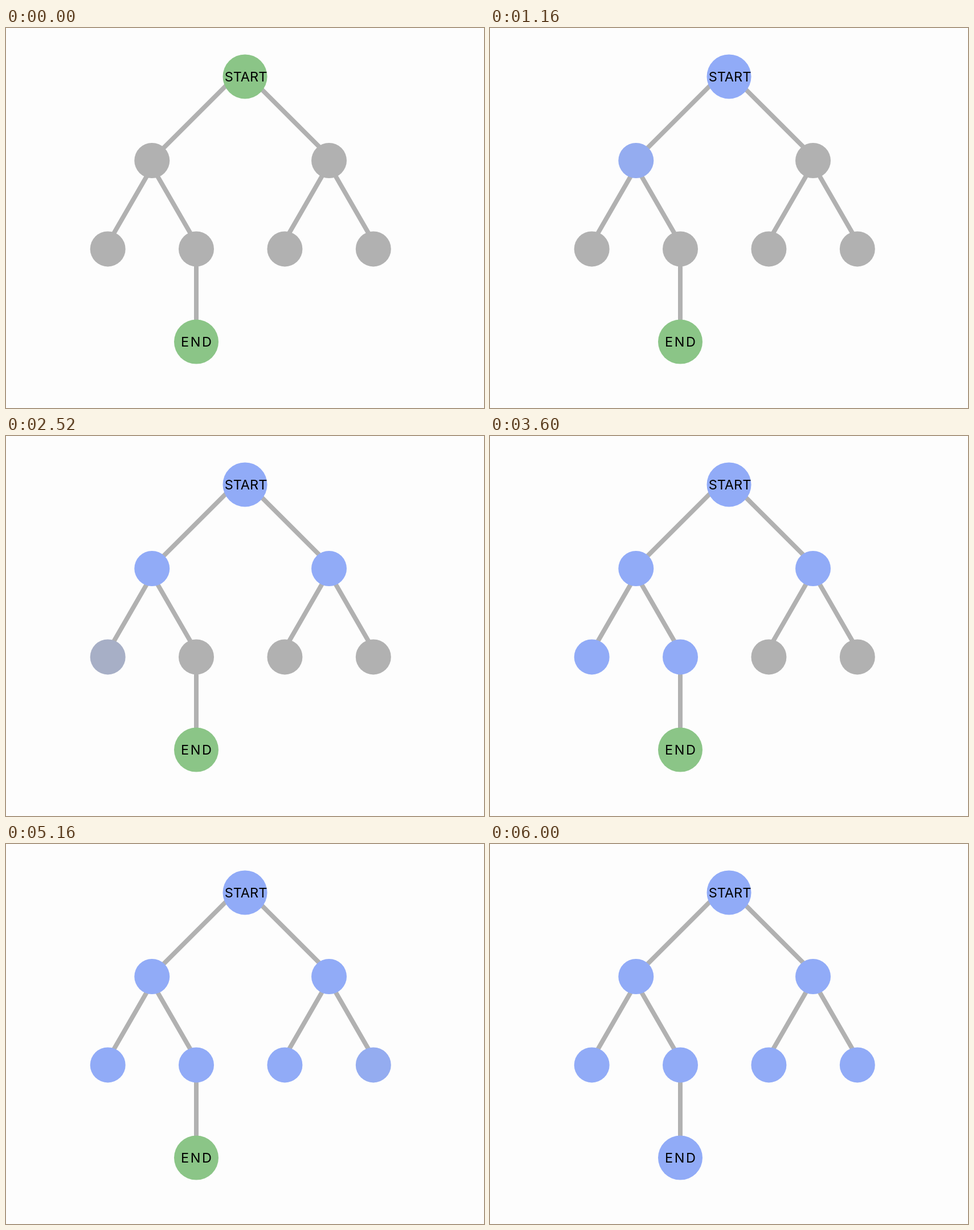
Animation, 839 px wide and 668 px high, one loop 8.2 s. Source, as an HTML page:

```html
<!DOCTYPE html>
<html lang="en">
<head>
<meta charset="utf-8">
<title>Breadth-first search</title>
<style>
  html, body { margin: 0; width: 100%; height: 100%; overflow: hidden; background: #fdfdfd; }
  svg { display: block; width: 839px; height: 668px; }
  .edges { stroke: #b1b1b1; stroke-width: 8; fill: none; }
  text { font: 400 23.5px Inter, "Open Sans", sans-serif; text-anchor: middle; fill: #000; }
  .wide { letter-spacing: 2.5px; }
</style>
</head>
<body>
<svg viewBox="0 0 839 668">
  <path class="edges" d="M402 85.5L256 231.5M427 86L567 226
    M256 245l-76 132M257 245l76 132M563.5 245l-76 132M569.7 245l76 132M334 388V551"/>
  <g id="nodes"></g>
  <text x="421" y="94.3">START</text>
  <text class="wide" x="335.2" y="560.3">END</text>
</svg>
<script>
const LOOP = 8200, FADE = 400, INTERVAL = 800;
const GREY = [177, 177, 177], GREEN = [139, 197, 135], BLUE = [145, 171, 247];

// Nodes in visiting order; each fade advances in steps between first and last.
const nodes = [
  { x: 419.5, y: 85.4, r: 39, color: GREEN, first: 40, last: 360, step: 40 },
  { x: 256.3, y: 233, first: 920, last: 1160 },
  { x: 567, y: 233, first: 1720, last: 1960 },
  { x: 178.7, y: 388.4, first: 2520, last: 2760 },
  { x: 334, y: 388.4, first: 3280, last: 3600 },
  { x: 489.4, y: 388.4, first: 4120, last: 4360 },
  { x: 644.8, y: 388.4, first: 4920, last: 5160 },
  { x: 334, y: 551.6, r: 39, color: GREEN, first: 5680, last: 6000, step: 40 }
];

const layer = document.getElementById('nodes');
for (const node of nodes) {
  node.el = document.createElementNS(layer.namespaceURI, 'circle');
  node.el.setAttribute('cx', node.x);
  node.el.setAttribute('cy', node.y);
  node.el.setAttribute('r', node.r || 31);
  layer.append(node.el);
}

function progress(index, time) {
  const { first, last, step = 80 } = nodes[index];
  const next = nodes[index + 1];
  if (time < first) return 0;
  if (next && time >= next.first) return 1;
  const held = first + Math.floor((Math.min(time, last) - first) / step) * step;
  return Math.min(1, (held - index * INTERVAL) / FADE);
}

function mix(from, to, amount) {
  return `rgb(${from.map((c, i) => Math.round(c + (to[i] - c) * amount))})`;
}

function draw() {
  const time = performance.now() % LOOP;
  nodes.forEach(({ el, color = GREY }, i) => {
    el.setAttribute('fill', mix(color, BLUE, progress(i, time)));
  });
  requestAnimationFrame(draw);
}
draw();
</script>
</body>
</html>
```
